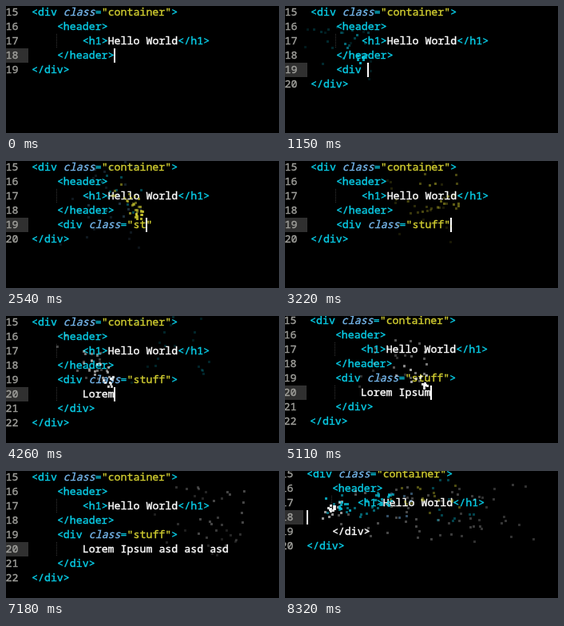
An HTML page with a canvas for the animation above (8.35 s loop, 342 by 159 pixels).

```html
<!DOCTYPE html>
<html lang="en">
<head>
<meta charset="utf-8">
<title>Typing with sparks</title>
<style>
html, body { margin: 0; width: 100%; height: 100%; overflow: hidden; background: #000; }
canvas { display: block; }
</style>
</head>
<body>
<canvas id="stage" width="342" height="159"></canvas>
<script>
const LOOP = 8350, CELL = 7.97, ROW = 18, LEFT = 32, TOP = -1;
const FONT = '13.28px "Noto Sans Mono", "DejaVu Sans Mono", monospace';
const TAG = '#08cce6', ATTR = '#74b4e8', STRING = '#d0cc30', TEXT = '#fff';
const HEAD = ['<div class="container">', '    <header>', '        <h1>Hello World</h1>'];
const ctx = document.getElementById('stage').getContext('2d');

let seed = 7;
function random(min, max) {
  seed = (seed * 16807) % 2147483647;
  return min + (max - min) * seed / 2147483647;
}

function tokenize(line) {
  let inTag = false;
  return [...line.matchAll(/<\/?\w*|>|"[^"]*"?|\w+|=/g)].map(m => {
    const text = m[0];
    let color = TEXT, italic = false;
    if (text[0] === '<') { inTag = true; color = TAG; }
    else if (text === '>') { inTag = false; color = TAG; }
    else if (inTag && text[0] === '"') color = STRING;
    else if (inTag && text === '=') color = TAG;
    else if (inTag) { color = ATTR; italic = true; }
    return { text, col: m.index, color, italic };
  });
}

function caret(pre) {
  const lines = pre.split('\n');
  const line = lines.at(-1);
  return { row: 2 + lines.length, col: line.length, line };
}

// Each key press stores the text around the caret, a jolt and a burst of sparks.
const keys = [{ t: -100, pre: '    </header>', post: '', shake: [0, 0], sparks: [] }];

function press(t, pre, post, force = 3) {
  const last = keys.at(-1);
  const from = caret(last.pre);
  const line = pre.length > last.pre.length && !pre.endsWith(' ') ? caret(pre).line : from.line;
  const color = tokenize(line).at(-1)?.color ?? TEXT;
  const jolt = () => Math.round(random(1, force)) * (random(0, 1) < 0.5 ? -1 : 1);
  const sparks = Array.from({ length: Math.round(random(5, 12)) }, () => ({
    x: LEFT + from.col * CELL, y: TOP + from.row * ROW + 9,
    vx: random(-1, 1), vy: random(-3.5, -1.5), color
  }));
  keys.push({ t, pre, post, shake: [jolt(), jolt()], sparks });
}

function type(text, start, step) {
  [...text].forEach((c, i) => {
    const { pre, post } = keys.at(-1);
    const tail = c === '"' ? (post ? '' : '"') : c === '>' ? '</div>' : post;
    press(start + i * step, pre + c, tail);
  });
}

function enter(t, indent, post) {
  press(t, keys.at(-1).pre + '\n' + ' '.repeat(indent), post);
}

enter(20, 4, '');
type('<div ', 300, 190);
type('clas', 1500, 110);
type('s="', 1980, 130);
type('stuff"', 2350, 110);
type('>', 3420, 0);
enter(3560, 8, '\n    </div>');
type('Lorem', 3700, 112);
type(' Ipsum', 4400, 130);
type(' asd a', 5560, 110);
keys.at(-1).shake = [3, 2];
type('sd asd', 6215, 85);
for (let i = 0; i < 17; i++) {
  const { pre, post } = keys.at(-1);
  press(7640 + i * 38, pre.replace(/(\n? +|\w+ *|[^\w\s]+)$/, ''), post, 5);
}
keys.at(-1).shake = [-5, -4];

function drawText(text, x, y, color) {
  ctx.fillStyle = ctx.strokeStyle = color;
  ctx.lineWidth = 0.4;
  ctx.fillText(text, x, y);
  ctx.strokeText(text, x, y);
}

function drawLine(line, row, orphan) {
  const base = TOP + row * ROW + 13;
  ctx.font = FONT;
  drawText(15 + row, -0.5, base, '#a0a09c');
  if (line.startsWith('        ')) {
    ctx.fillStyle = '#343434';
    for (let y = 0; y < ROW; y += 2) ctx.fillRect(63, TOP + row * ROW + y, 1, 1);
  }
  for (const { text, col, color, italic } of tokenize(line)) {
    ctx.font = (italic ? 'italic ' : '') + FONT;
    drawText(text, LEFT + col * CELL, base, orphan ? TEXT : color);
  }
}

function drawSparks(t) {
  for (const key of keys) {
    const n = (t - key.t) * 0.06;
    const alpha = 0.96 ** n;
    if (n < 0 || alpha < 0.1) continue;
    ctx.globalAlpha = alpha;
    for (const s of key.sparks) {
      ctx.fillStyle = s.color;
      ctx.fillRect(Math.round(s.x + s.vx * n - 1.5),
        Math.round(s.y + s.vy * n + 0.0375 * n * n - 1.5), 3, 3);
    }
  }
  ctx.globalAlpha = 1;
}

function draw(t) {
  const key = keys.findLast(k => k.t <= t);
  const age = t - key.t;
  const { row, col } = caret(key.pre);
  const inner = (key.pre + key.post).split('\n');
  const lines = [...HEAD, ...inner, '</div>'];
  const noOpener = !key.pre.includes('<div');

  ctx.setTransform(1, 0, 0, 1, 0, 0);
  ctx.fillStyle = '#000';
  ctx.fillRect(0, 0, 342, 159);
  if (age < 75) ctx.translate(...key.shake);

  ctx.fillStyle = '#303030';
  ctx.fillRect(-9, TOP + row * ROW, 37, ROW);
  lines.forEach((line, i) => drawLine(line, i, noOpener && line === '    </div>'));
  if (age % 1060 < 530) {
    ctx.fillStyle = '#fff';
    ctx.fillRect(Math.floor(LEFT + col * CELL), TOP + row * ROW, 2, ROW);
  }
  drawSparks(t);
}

const begin = performance.now();
function tick() {
  draw((performance.now() - begin) % LOOP);
  requestAnimationFrame(tick);
}
tick();
</script>
</body>
</html>
```
